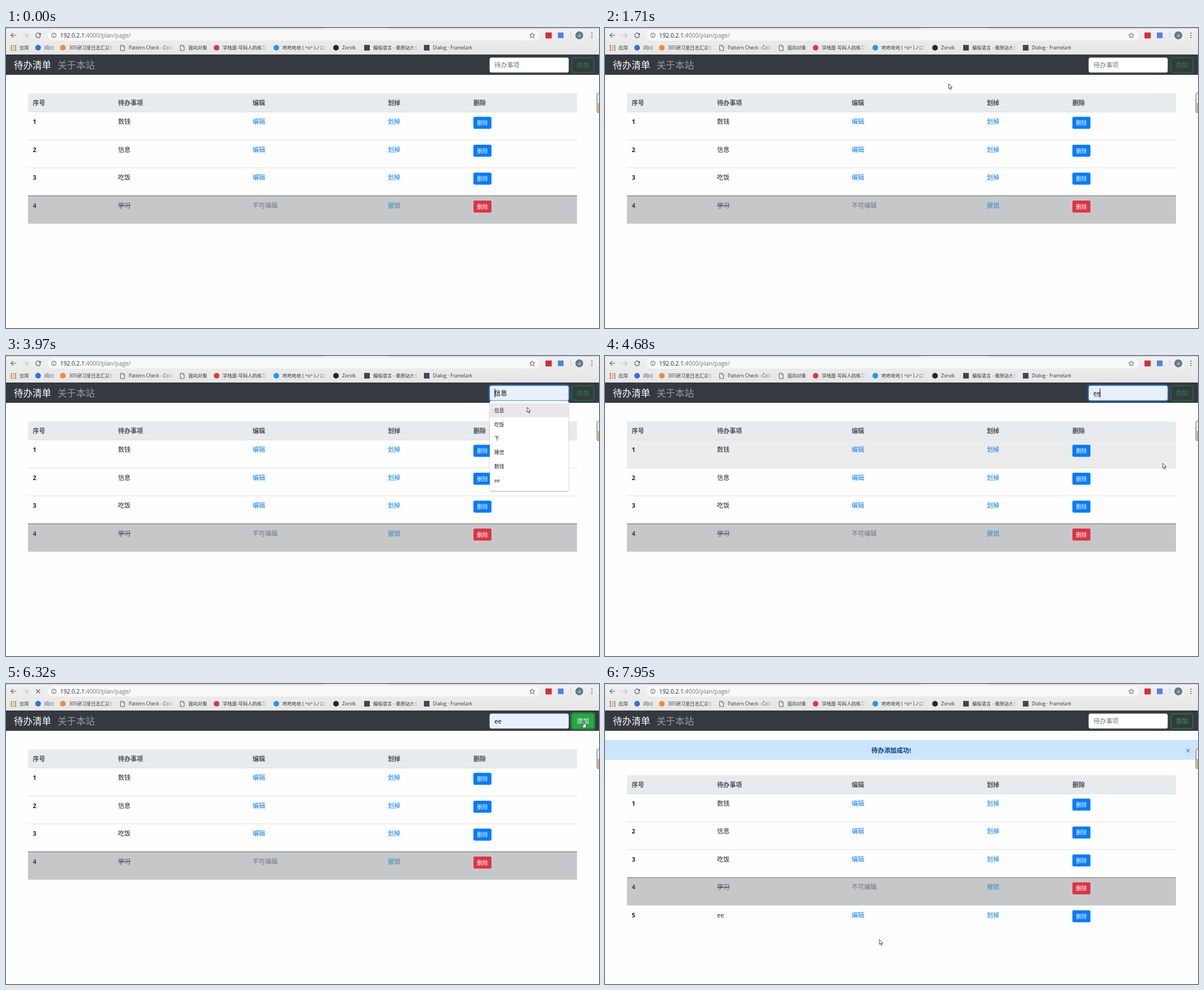
An HTML page for the animation above (8 s loop, 1053 px wide and 532 px high).

```html
<!DOCTYPE html>
<html lang="zh-CN">
<head>
<meta charset="utf-8">
<style>
html, body { margin: 0; width: 100%; height: 100%; overflow: hidden; background: #fff; }
svg { display: block; width: 100%; height: 100%; }
text { font-family: "Open Sans", "Noto Sans CJK SC", "Noto Sans CJK", sans-serif; white-space: pre; }
</style>
</head>
<body>
<svg id="stage" viewBox="0 0 1053 532"></svg>
<script>
const LOOP = 8000, STEP = 78.1, START = 440;
const BLUE = '#007bff', GREY = '#6c757d', INK = '#212529', ICON = '#5f6368';

// Steps at which the state changes
const OPEN = 33, PREVIEW = 45, CHOSEN = 52, CLICK = 73, LOADING = 75, LOADED = 78;

// Pointer path: step, x, y
const PATH = [
  [0, 330, 512], [4, 352, 390], [9, 388.5, 213.5], [10, 394, 190], [12, 470, 165],
  [16, 610, 99], [19, 745, 170], [21, 815, 220], [23, 879, 145], [26, 1042, 115],
  [28, 1000, 88], [31, 946, 65], [35, 946, 65], [38, 943, 69], [40, 943, 70], [44, 943, 70],
  [45, 925, 91], [50, 915, 215], [52, 915, 217], [54, 990, 190], [56, 1042, 150],
  [59, 965, 123.5], [63, 965, 123.5], [66, 1010, 115], [68, 1043, 90], [71, 1026, 67],
  [83, 1026, 67], [86, 1043, 100], [89, 732, 180], [94, 560, 416], [95, 523, 437], [96, 487, 453]
];
const TASKS = ['数钱', '信息', '吃饭', '学习', 'ee'];
const SUGGESTIONS = ['信息', '吃饭', '下', '睡觉', '数钱', 'ee'];
const COLUMNS = [47.5, 199, 438, 678, 830];
const BOOKMARKS = [ // icon x, icon kind, colour, label, clip width
  [57, 'dot', '#2f6fe0', '问川', 40], [101, 'dot', '#f08a3c', '305研习室日志汇总册', 78],
  [207, 'page', '', 'Pattern Check - Code lab', 78], [313, 'page', '', '面向对象', 40],
  [374, 'dot', '#e0383e', '学栈屋-写码人的练习室', 78], [480, 'dot', '#1ba0dc', '咚咚呛呛 ( ^o^ )ノ口口', 78],
  [586, 'dot', '#24292e', 'Zorvik', 40], [641, 'square', '#444', '编程语言 - 栗原站大全', 79],
  [747, 'square', '#4b4358', 'Dialog · Framelark', 90]
];

const rect = (x, y, w, h, fill, extra = '') =>
  `<rect x="${x}" y="${y}" width="${w}" height="${h}" fill="${fill}" ${extra}/>`;
const circle = (x, y, r, fill, extra = '') => `<circle cx="${x}" cy="${y}" r="${r}" fill="${fill}" ${extra}/>`;
const line = (d, stroke, width = 1.2) => `<path d="${d}" fill="none" stroke="${stroke}" stroke-width="${width}"/>`;
// Text is placed by its vertical centre
const text = (x, cy, s, size = 11.1, fill = INK, extra = '') =>
  `<text x="${x}" y="${cy + size * .37}" font-size="${size}" fill="${fill}" ${extra}>${s}</text>`;
const BOLD = 'font-weight="700"', MIDDLE = 'text-anchor="middle"';

function bookmark([x, kind, color, label, width]) {
  const icon = kind === 'dot' ? circle(x, 35, 5, color)
    : kind === 'square' ? rect(x - 5, 30, 10, 10, color)
    : line(`M${x - 3.5} 30.5h4.5l2.5 2.5v7h-7zM${x + 1} 30.5v2.5h2.5`, ICON, 1);
  return icon + `<svg x="${x + 11}" y="26" width="${width}" height="18">${text(0, 9, label, 8.3, '#333')}</svg>` +
    (width > 70 && width < 80 ? rect(x + width - 1, 27, 12, 16, 'url(#fade)') : '');
}

function browser(loading) {
  let apps = '';
  const colors = ['#e04a3f', '#f0a030', '#3f9c50', '#4285d8'];
  for (let i = 0; i < 9; i++)
    apps += rect(8.5 + i % 3 * 3.7, 30.5 + Math.floor(i / 3) * 3.7, 2.3, 2.3, colors[(i + Math.floor(i / 3)) % 4]);
  return rect(0, 0, 1053, 47, 'url(#bar)') + rect(0, 0, 562, 1, '#cdcdcd') + rect(680, 0, 373, 1, '#cdcdcd') +
    rect(74, 4, 873, 18, '#f9f9f9', 'rx="9"') +
    line('M18 13H9M13 8.8L8.8 13l4.2 4.2', ICON) + line('M30 13h9M35 8.8l4.2 4.2-4.2 4.2', '#bfc1c3') +
    (loading ? line('M53.5 9.5l7 7M60.5 9.5l-7 7', ICON)
      : line('M60.6 10.8A4.2 4.2 0 1 0 61.2 14', ICON) + '<path d="M62 8.5v4.2h-4.2z" fill="#5f6368"/>') +
    circle(85, 13, 4, 'none', 'stroke="#5f6368"') + line('M85 12.3v3M85 10.3v1.1', ICON, 1) +
    text(96, 13, '192.0.2.1<tspan fill="#777">:4000/plan/page/</tspan>', 10.3, '#2b2b2b') +
    line('M934.5 8.5l1.3 3.1 3.4.3-2.6 2.2.8 3.3-2.9-1.8-2.9 1.8.8-3.3-2.6-2.2 3.4-.3z', ICON, 1) +
    rect(958, 8, 11, 10.5, '#d32d3a') + rect(980, 8, 10, 10, '#4a86e8') + rect(1002, 8, 1, 10, '#ccc') +
    circle(1018, 13, 7, '#5d7b8a') + text(1018, 12.6, 'd', 8, '#fff', MIDDLE) +
    [9, 13, 17].map(y => circle(1040.5, y, 1.1, ICON)).join('') +
    apps + text(24, 35, '应用', 8.4, '#333') + BOOKMARKS.map(bookmark).join('');
}

function navbar(k, overButton) {
  const focus = k >= OPEN && k < CLICK, loaded = k >= LOADED;
  const pressed = k >= CLICK && !loaded, filled = overButton || pressed;
  const preview = k >= PREVIEW && k < CHOSEN;
  const value = preview ? SUGGESTIONS[suggestionAt(pointer(k)[1])] : k >= CHOSEN && !loaded ? 'ee' : '';
  const caret = focus && !(k >= 38 && k < 45) && !(k >= 62 && k < 69);
  const green = loaded || filled ? '#28a745' : '#208c3f';
  return rect(0, 47, 1053, 36, '#343a40') +
    text(14, 66, '待办清单', 16.6, '#fff') + text(91.5, 66, '关于本站', 16.6, '#999c9f') +
    (focus ? rect(857.5, 51, 143, 29.5, 'none', 'rx="4" stroke="#007bff" stroke-opacity=".4" stroke-width="2.4"') : '') +
    rect(859, 52.8, 140, 26, value ? '#e8f0fe' : '#fff', `rx="2.8" stroke="${focus ? '#80bdff' : '#ced4da'}" stroke-width=".8"`) +
    text(867.3, 66, value || '待办事项', 11.2, value ? '#000' : GREY) +
    (k >= CHOSEN && k < CLICK ? line('M868 72.5l1.5-1 1.5 1 1.5-1 1.5 1 1.5-1 1.5 1 1.5-1 1.5 1', '#e03030', .8) : '') +
    (caret ? rect(k >= CHOSEN ? 878.6 : 867.4, 58, 1, 15.5, '#000') : '') +
    (pressed ? rect(1003.2, 51.2, 42.2, 29, 'none', 'rx="4" stroke="#28a745" stroke-opacity=".5" stroke-width="2.4"') : '') +
    rect(1005, 52.8, 39, 26, filled ? green : 'none', `rx="2.8" stroke="${green}" stroke-width=".9"`) +
    text(1024.5, 66, '添加', 11.2, filled ? '#fff' : green, MIDDLE);
}

function table(top, count, hovered) {
  let out = rect(39, top - 33, 975, 33, '#e8ebee') + rect(39, top - .6, 975, 1, '#d6dade');
  ['序号', '待办事项', '编辑', '划掉', '删除'].forEach((s, i) => out += text(COLUMNS[i], top - 16, s, 11.1, '#495057', BOLD));
  for (let i = 0; i < count; i++) {
    const y = top + i * 49.5, cy = y + 17, done = i === 3;
    if (done) out += rect(39, y, 975, 49.5, '#c6c7c9');
    else if (i === hovered) out += rect(39, y, 975, 49.5, '#ececec');
    if (i && i < 4) out += rect(39, y - .5, 975, 1, done ? '#6d7073' : '#dee2e6');
    out += text(COLUMNS[0], cy, i + 1, 11.1, done ? '#3c4146' : INK, BOLD) +
      text(COLUMNS[1], cy, TASKS[i], 11.1, done ? '#4a4f54' : INK, done ? 'text-decoration="line-through"' : '') +
      text(COLUMNS[2], cy, done ? '不可编辑' : '编辑', 11.1, done ? GREY : BLUE) +
      text(COLUMNS[3], cy, done ? '撤销' : '划掉', 11.1, done ? '#2f8cc0' : BLUE) +
      rect(830, y + 8.5, 32, 21.3, done ? '#dc3545' : BLUE, 'rx="2.2"') +
      text(846, y + 19.4, '删除', 9.8, '#fff', MIDDLE);
  }
  return out;
}

const suggestionAt = y => Math.max(0, Math.min(5, Math.floor((y - 84) / 24.8)));

function dropdown(k) {
  const active = k >= PREVIEW ? suggestionAt(pointer(k)[1]) : -1;
  return rect(859, 79.5, 140, 159.5, '#fff', 'rx="2" filter="url(#shadow)"') +
    SUGGESTIONS.map((s, i) => (i === active ? rect(859, 84 + i * 24.8, 140, 24.8, '#e8e8eb') : '') +
      text(867, 96.6 + i * 24.8, s, 8.9, '#222')).join('');
}

const alertBar = () => rect(0, 99, 1053, 35.5, '#cce5ff') +
  text(473, 117.5, '待办添加成功!', 11.2, '#004085', BOLD) + line('M1031.8 115l6.4 6.4M1038.2 115l-6.4 6.4', '#5f87b5', 1.3);

function pointer(k) {
  const i = Math.max(1, PATH.findIndex(p => p[0] >= k));
  const [ka, xa, ya] = PATH[i - 1], [kb, xb, yb] = PATH[i];
  const f = (k - ka) / (kb - ka);
  return [xa + (xb - xa) * f, ya + (yb - ya) * f];
}

function cursor(x, y, kind) {
  const shapes = {
    arrow: '<path d="M.3 0v8.8l2-1.8 1.4 3.3 1.5-.6-1.4-3.2h2.7z" fill="#fff" stroke="#222" stroke-width=".8"/>',
    beam: line('M-2.5-4.5h2l.5.5.5-.5h2M0-4v8M-2.5 4.5h2l.5-.5.5.5h2', '#222', .9),
    hand: '<path d="M-1 0q1-1 1.8 0v3.6l3.8 1v3.2l-1.2 3h-4.2l-3-4 .8-.9 2 1.3z" fill="#fff" stroke="#222" stroke-width=".8"/>'
  };
  return `<g transform="translate(${x} ${y})">${shapes[kind]}</g>`;
}

const inside = (x, y, left, right) => x >= left && x <= right && y >= 52 && y <= 79;

function draw(k) {
  const visible = k >= 0, loaded = k >= LOADED, open = k >= OPEN && k < CHOSEN;
  const [x, y] = visible ? pointer(k) : [-99, -99];
  const overButton = inside(x, y, 1004, 1045), overInput = inside(x, y, 858, 1000);
  const top = loaded ? 194.7 : 149;
  const hovered = !open && x >= 39 && x <= 1014 ? Math.floor((y - top) / 49.5) : -1;
  return `<defs>
    <linearGradient id="bar" x2="0" y2="1"><stop stop-color="#f0f0f0"/><stop offset="1" stop-color="#e6e6e6"/></linearGradient>
    <linearGradient id="fade"><stop stop-color="#e8e8e8" stop-opacity="0"/><stop offset="1" stop-color="#e8e8e8"/></linearGradient>
    <filter id="shadow"><feDropShadow dx="0" dy="1" stdDeviation="1.2" flood-opacity=".35"/></filter></defs>` +
    rect(0, 0, 1053, 532, '#fefefe') + browser(k >= LOADING && k <= LOADED) + navbar(k, overButton) +
    (loaded ? alertBar() : '') + table(top, loaded ? 5 : 4, hovered) +
    rect(1049.5, 115.5, 12, 34.5, '#fff', 'rx="2" stroke="#555"') + rect(1051, 133, 3, 16, '#dc9a4a') +
    (open ? dropdown(k) : '') +
    (visible ? cursor(x, y, overButton ? 'hand' : overInput ? 'beam' : 'arrow') : '');
}

const stage = document.getElementById('stage');
let shown;
function tick() {
  const k = Math.max(-1, Math.min(96, Math.floor((performance.now() % LOOP - START - (shown < 0 ? 10 : 0)) / STEP)));
  if (k !== shown) stage.innerHTML = draw(shown = k);
  requestAnimationFrame(tick);
}
tick();
</script>
</body>
</html>
```
